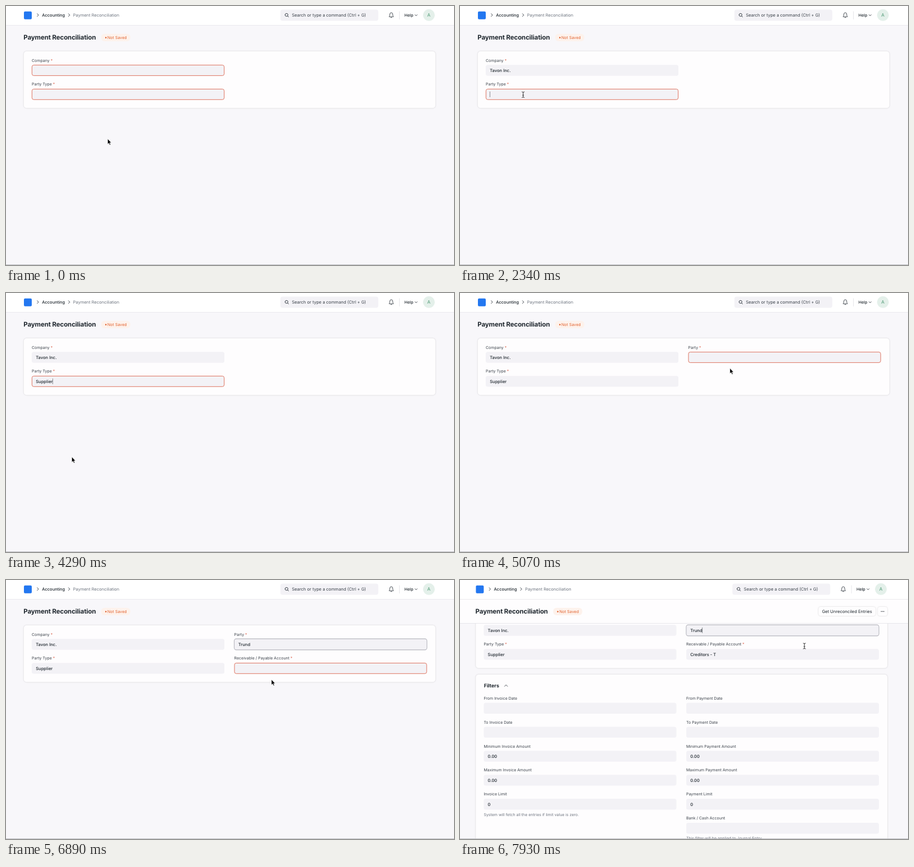
An HTML page for the animation above (8 s loop, 800 by 463 pixels).

```html
<!DOCTYPE html>
<html lang="en">
<head>
<meta charset="utf-8">
<title>Payment Reconciliation</title>
<style>
html, body { margin: 0; height: 100%; overflow: hidden; background: #f8f7fa; }
svg { display: block; width: 100vw; height: 100vh; font-family: Inter, "Open Sans", sans-serif; text-rendering: geometricPrecision; }
.card { fill: #fefdfe; filter: drop-shadow(0 .4px 1px #0000002e); }
.menu { fill: #fefdfe; filter: drop-shadow(0 2px 4px #00000030); }
.line { fill: none; stroke-linecap: round; stroke-linejoin: round; }
</style>
</head>
<body>
<svg id="stage" viewBox="0 0 800 463"></svg>
<script>
const LOOP = 8000, STEP = 130, ROW = 42.9;
const LEFT = 46, RIGHT = 407.6, FIELD_W = 344;
const INK = '#1f272e', LABEL = '#3b424a', GREY = '#6f7680', RED = '#dc6650', BLUE = '#2a8de0', FILL = '#f3f2f6';
const stage = document.getElementById('stage');
let t = -1;

const during = (from, to) => t >= from && t < to;

// Text is placed by the middle of its capitals.
const text = (x, y, str, size = 7, weight = 400, fill = LABEL, anchor = 'start') =>
  `<text x="${x}" y="${y + .364 * size}" font-size="${size}" font-weight="${weight}" fill="${fill}" text-anchor="${anchor}">${str}</text>`;
const rect = (x, y, w, h, r, attrs) => `<rect x="${x}" y="${y}" width="${w}" height="${h}" rx="${r}" ${attrs}/>`;
const line = (d, color = LABEL, width = 1) => `<path class="line" d="${d}" stroke="${color}" stroke-width="${width}"/>`;
const glass = (x, y, color, width) =>
  line(`M${x - 3} ${y}a2.6 2.6 0 1 0 5.2 0a2.6 2.6 0 1 0 -5.2 0M${x + 1.5} ${y + 1.9}l1.8 1.8`, color, width);
const group = (x, y, body) => `<g transform="translate(${x} ${y})">${body}</g>`;

function field(x, y, label, value = '', { need, edge, caret } = {}) {
  const star = need ? ` <tspan fill="${RED}">*</tspan>` : '';
  const bar = caret ? '<tspan dx="-1" dy=".3" font-size="8.5" font-weight="300">|</tspan>' : '';
  let box = rect(x, y + 8.3, FIELD_W, 19.4, 3.5, `fill="${FILL}"`);
  if (edge === 'red') box = rect(x + .4, y + 8.6, FIELD_W - .8, 18.8, 3.2, `fill="${FILL}" stroke="${RED}" stroke-width=".9"`);
  if (edge === 'ring') box = rect(x - .1, y + 8.1, FIELD_W + .2, 19.8, 3.8, `fill="${FILL}" stroke="#b7b7bf" stroke-width="1.1"`);
  return text(x, y, label + star) + box + text(x + 7.2, y + 18.1, value + bar, 7.6, 500, INK);
}

// Rows are [title, subtitle]; the first and the hovered one are tinted.
function menu(x, top, rows, links, pointer, { clip, scroll = 0 } = {}) {
  const w = clip ? 333 : 336.5;
  let y = top + 2.6 - scroll, body = '';
  rows.forEach(([title, sub], i) => {
    const h = sub ? 33.8 : 22.5;
    const hover = pointer.kind === 'hand' && pointer.y > y && pointer.y < y + h;
    if (!i || hover) body += rect(x + 3.8, y, w, h, 3, `fill="${FILL}"`);
    body += text(x + 9.3, y + 11.4, title, 7.5, 700, INK);
    if (sub) body += text(x + 9.3, y + 22.6, sub, 7, 400, INK);
    y += sub ? 36.75 : 25.7;
  });
  links.forEach((label, i) => {
    const cy = y + 11.3;
    body += i ? glass(x + 12.8, cy, BLUE, 1.2) : line(`M${x + 9.9} ${cy}h5M${x + 12.4} ${cy - 2.5}v5`, BLUE, 1.5);
    body += text(x + (i ? 21.4 : 20.6), cy, label, 7.5, 400, BLUE);
    y += 25.7;
  });
  const h = clip || y - top;
  const bar = clip ? rect(x + 340.3, top + scroll * .52, 3.4, 90, 1, 'fill="#b9b9bc"') : '';
  return rect(x, top, FIELD_W, h, 3, 'class="menu"') +
    `<clipPath id="view">${rect(x, top, FIELD_W, h, 3, '')}</clipPath><g clip-path="url(#view)">${body}</g>` + bar;
}

const PATH = [
  [0, 181.5, 237.5, 'arrow'], [130, 84, 138, 'arrow'], [260, 84, 138, 'arrow'],
  [390, 98, 115, 'beam'], [520, 103, 115, 'beam'], [650, 109, 165, 'arrow'],
  [780, 109, 165, 'arrow'], [910, 109, 163, 'hand'], [1690, 110, 160, 'hand'],
  [1820, 111, 163, 'beam'], [2470, 113, 158, 'beam'], [2860, 113, 160, 'beam'],
  [2990, 114, 180, 'hand'], [3380, 118, 293, 'hand'], [3640, 117.5, 293, 'arrow'],
  [4290, 117.5, 293, 'arrow'], [4940, 472, 154, 'arrow'], [5200, 492, 115, 'beam'],
  [5330, 495, 112, 'beam'], [5980, 495, 112, 'beam'], [6110, 490, 130, 'hand'],
  [6500, 474, 178, 'hand'], [6630, 474, 178, 'arrow'], [6890, 474, 178, 'arrow'],
  [7410, 600, 122, 'beam'], [7540, 615, 118, 'beam'], [LOOP, 615, 118, 'beam']
];

function pointerAt() {
  const i = PATH.findIndex(key => key[0] > t) - 1;
  const [t0, x0, y0, kind] = PATH[i], [t1, x1, y1] = PATH[i + 1];
  const u = (t - t0) / (t1 - t0), e = u * u * (3 - 2 * u);
  return { x: x0 + (x1 - x0) * e, y: y0 + (y1 - y0) * e, kind };
}

const CURSORS = {
  arrow: '<path d="M0 0V9.6L2.2 7.6L3.7 11L5.3 10.3L3.8 7H6.6Z" fill="#000" stroke="#fff" stroke-width=".6"/>',
  beam: line('M-2 -5Q0 -5 0 -3.8Q0 -5 2 -5M0 -4V4M-2 5Q0 5 0 3.8Q0 5 2 5M-1 .9H1', '#222', .9),
  hand: '<path d="M-.9 1Q-.9 0 0 0T.9 1V4.2Q1.8 3.6 2.4 4.4Q3.4 4 3.8 4.9Q5.2 4.6 5.1 6.2Q5 8.6 4 10.5H-.5Q-1.4 8.6-3 6.8Q-3.2 5.3-.9 6.6Z" fill="#fff" stroke="#111" stroke-width=".9" stroke-linejoin="round"/>'
};

const navbar = () =>
  rect(-10, 0, 820, 34, 0, 'fill="#fff"') + rect(-10, 34, 820, .8, 0, 'fill="#e6e5ea"') +
  rect(32, 9.8, 14, 14, 2, 'fill="#2377f0"') +
  line('M55.8 13.8l2.3 2.4l-2.3 2.4M111.6 13.8l2.3 2.4l-2.3 2.4') +
  text(64.2, 16.2, 'Accounting', 7.5, 500, INK) +
  text(119.8, 16.2, 'Payment Reconciliation', 7.5, 400, GREY) +
  rect(490, 6.4, 174.8, 20.2, 4, `fill="${FILL}"`) + glass(501.3, 15.9, LABEL, 1) +
  text(510.4, 16.4, 'Search or type a command (Ctrl + G)', 7.6) +
  line('M684.3 18.9Q685.4 18 685.4 15Q685.4 11.9 688 11.9T690.6 15Q690.6 18 691.7 18.9ZM687 20.6Q688 21.4 689 20.6', LABEL, .9) +
  rect(702.3, 9.5, .7, 14.5, 0, 'fill="#dcdce1"') +
  text(711.5, 16.3, 'Help', 7.2, 500, INK) + line('M730.4 15.6l1.9 1.9l1.9-1.9') +
  '<circle cx="755.2" cy="16.3" r="10.5" fill="#e4f0ea"/>' +
  text(755.2, 16.4, 'A', 8.2, 400, '#4f9a76', 'middle');

const pageHead = (open, stuck) =>
  (stuck ? rect(-10, 34.8, 820, 42.6, 0, 'fill="#fefdfe"') + rect(-10, 77.2, 820, .8, 0, 'fill="#e2e1e6"') : '') +
  `<g letter-spacing="-.11">${text(31.2, 55.6, 'Payment Reconciliation', 11.5, 700, INK)}</g>` +
  rect(170, 49.8, 52, 13.2, 6, 'fill="#fdf2ec"') +
  '<circle cx="178.3" cy="56.6" r="1.3" fill="#e2622f"/>' + text(181, 56.6, 'Not Saved', 7.1, 400, '#e2622f') +
  (open ? rect(643.8, 48, 101.8, 16, 4, 'class="card"') + text(694.7, 56, 'Get Unreconciled Entries', 7.6, 400, INK, 'middle') +
    rect(749.7, 48, 17, 16, 4, 'class="card"') +
    [-2.3, 0, 2.3].map(d => `<circle cx="${758.2 + d}" cy="56.2" r=".75" fill="${INK}"/>`).join('') : '');

function filters() {
  let out = rect(31.8, 194, 735, 320, 5, 'class="card"') + text(46.3, 213.3, 'Filters', 8.9, 700, INK) +
    line('M83.2 215.2l2.6-2.8l2.6 2.8', LABEL, .9);
  ['Invoice', 'Payment'].forEach((kind, col) => {
    const labels = [`From ${kind} Date`, `To ${kind} Date`, `Minimum ${kind} Amount`, `Maximum ${kind} Amount`, `${kind} Limit`];
    const values = ['', '', '0.00', '0.00', '0'];
    labels.forEach((label, i) => out += field(col ? RIGHT : LEFT, 236.2 + i * ROW, label, values[i]));
  });
  return out + text(LEFT, 444, 'System will fetch all the entries if limit value is zero.', 7, 400, GREY) +
    field(RIGHT, 236.2 + 5 * ROW, 'Bank / Cash Account') +
    text(RIGHT, 486.4, 'This filter will be applied to Journal Entry.', 7, 400, GREY);
}

const edge = (chosen, left) => t < chosen ? 'red' : t < left ? 'ring' : '';

function form() {
  let out = rect(31.8, 81, 735, 101.5, 5, 'class="card"') +
    field(LEFT, 97, 'Company', t >= 1820 ? 'Tavon Inc.' : '', { need: 1, edge: edge(1950, 2340), caret: during(520, 1040) }) +
    field(LEFT, 97 + ROW, 'Party Type', t >= 3770 ? 'Supplier' : '',
      { need: 1, edge: edge(4420, 5070), caret: during(2340, 2860) || during(4160, 4680) });
  if (t >= 4420) out += field(RIGHT, 97, 'Party', t >= 6630 ? 'Trund' : '',
    { need: 1, edge: edge(6760, LOOP), caret: during(5590, 6110) || t >= 7930 });
  if (t >= 6760) out += field(RIGHT, 97 + ROW, 'Receivable / Payable Account', t >= 7020 ? 'Creditors - T' : '',
    { need: 1, edge: edge(7020, 0) });
  return out;
}

function menus(pointer) {
  if (during(910, 1820))
    return menu(LEFT, 126, [['ORVE Co.'], ['Tavon Inc.']], ['Create a new Company', 'Advanced Search'], pointer);
  if (during(2860, 3640))
    return menu(LEFT, 168.3, [['Customer', 'Selling'], ['Donor', 'Non Profit'], ['Employee', 'HR'], ['Member', 'Non Profit'],
      ['Shareholder', 'Accounts'], ['Student', 'Education'], ['Supplier', 'Buying']],
      ['Create a new Party Type', 'Advanced Search'], pointer, { clip: 174, scroll: t >= 3510 ? 110 : 0 });
  if (during(5850, 6630))
    return menu(RIGHT, 126, ['Ovrel Co.', 'Trund', 'Pomul Inc.'].map(name => [name, 'All Supplier Groups']),
      ['Create a new Supplier', 'Advanced Search'], pointer);
  return '';
}

function draw() {
  const open = t >= 7150, scroll = t >= 7930 ? 25 : 0;
  const pointer = pointerAt();
  stage.innerHTML = rect(0, 0, 800, 463, 0, 'fill="#f8f7fa"') +
    group(open ? -3.6 : 0, 0,
      group(0, -scroll, form() + (open ? filters() : '')) + pageHead(open, scroll) + navbar() + menus(pointer)) +
    rect(0, 462, 800, 1, 0, 'fill="#bdbdc2"') +
    group(pointer.x, pointer.y, CURSORS[pointer.kind]);
}

function tick() {
  const now = Math.floor(performance.now() % LOOP / STEP) * STEP;
  if (now !== t) {
    t = now;
    draw();
  }
  requestAnimationFrame(tick);
}
tick();
</script>
</body>
</html>
```
